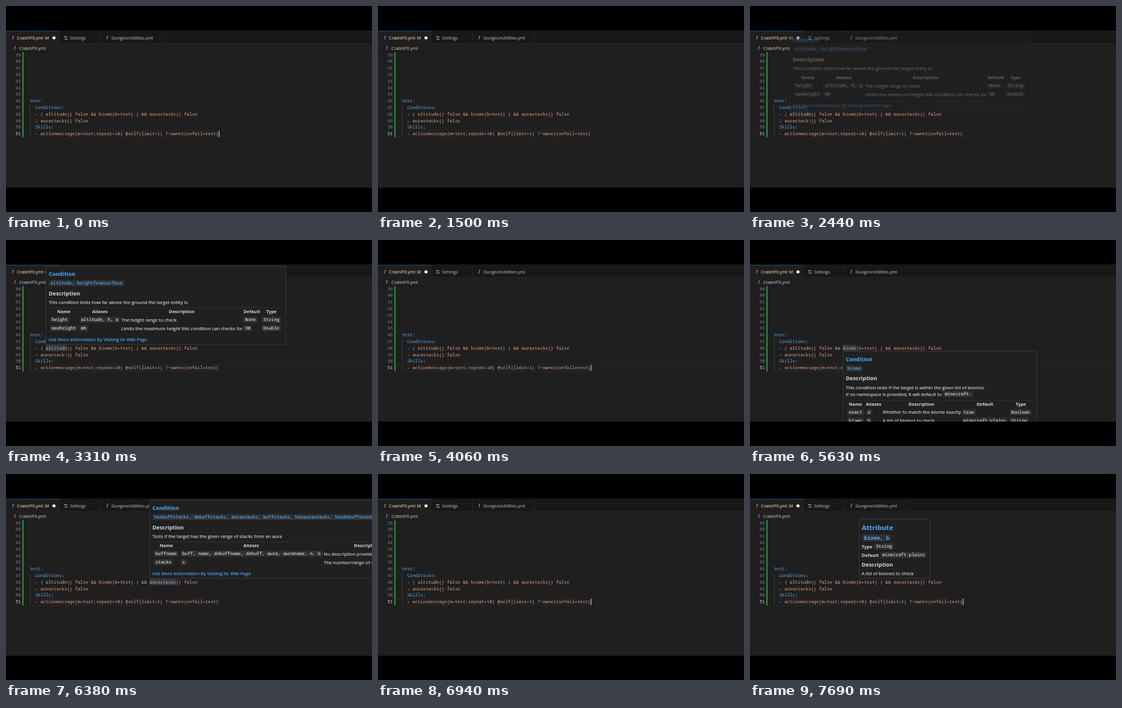
An HTML page that plays this animation: 600 by 338 pixels, repeating every 8000 ms.

```html
<!DOCTYPE html>
<html lang="en">
<head>
<meta charset="utf-8">
<title>Editor hover help</title>
<style>
html, body { margin: 0; width: 100%; height: 100%; overflow: hidden; background: #000; }
svg { display: block; width: 600px; height: 338px; }
text {
  white-space: pre; font: 7.58px "Open Sans", "Noto Sans", sans-serif;
  color: #d6d6d6; fill: currentColor; stroke: currentColor; stroke-width: .15px;
}
tspan { fill: currentColor; stroke: currentColor; }
.tab { font-size: 7px; color: #a2a2a2; }
.path { color: #b0b0b0; }
.changed { color: #e2c08d; }
.mono { font: 7.27px "Noto Sans Mono", "DejaVu Sans Mono", monospace; }
.code { color: #ccc; stroke-width: .08px; }
.num { text-anchor: end; color: #6e7681; }
.now { color: #ccc; }
.key { color: #569cd6; }
.str { color: #ce9178; }
.bang { font-size: 9px; font-weight: 700; font-style: italic; color: #a074c4; }
.head { font-size: 8.95px; font-weight: 700; stroke: none; }
.title { font-size: 11.2px; font-weight: 700; stroke: none; }
.th { font-size: 7.3px; font-weight: 700; text-anchor: middle; stroke: none; }
.bold { font-weight: 700; stroke: none; }
.big { font-size: 8.6px; }
.blue { color: #4daafc; }
.chip { fill: #303031; }
.word { fill: #2b3b47; }
.box { fill: #202020; stroke: #404040; stroke-width: .8; }

.pop { opacity: 0; animation: 8s step-end infinite; }
.altitude { animation-name: altitude; }
.biome { animation-name: biome; }
.aura { animation-name: aura; }
.attr { animation-name: attr; }
@keyframes altitude { 0% { opacity: 0 } 30.47% { opacity: .35 } 31.25% { opacity: .8 } 32.03% { opacity: 1 } 46.875%, 100% { opacity: 0 } }
@keyframes biome { 0% { opacity: 0 } 55.47% { opacity: .35 } 56.25% { opacity: .8 } 57.03% { opacity: 1 } 74.22%, 100% { opacity: 0 } }
@keyframes aura { 0% { opacity: 0 } 74.22% { opacity: .35 } 75% { opacity: .8 } 75.78% { opacity: 1 } 84.375%, 100% { opacity: 0 } }
@keyframes attr { 0% { opacity: 0 } 90.625% { opacity: .35 } 91.41% { opacity: .8 } 92.19%, 100% { opacity: 1 } }

#caret { animation: blink 1s step-end -312ms infinite; }
@keyframes blink { 0% { opacity: 1 } 50%, 100% { opacity: 0 } }

#mouse { animation: mouse 8s infinite; }
@keyframes mouse {
  0% { transform: translate(279px, 252px); animation-timing-function: step-end }
  2.34% { transform: translate(279px, 252px); animation-timing-function: steps(12) }
  11.72% { transform: translate(238px, 245px); animation-timing-function: steps(9) }
  18.75% { transform: translate(159px, 235px); animation-timing-function: steps(9) }
  25.78% { transform: translate(97px, 187px); animation-timing-function: step-end }
  42.97% { transform: translate(97px, 187px); animation-timing-function: steps(13) }
  53.125% { transform: translate(175px, 186px); animation-timing-function: step-end }
  65.625% { transform: translate(175px, 186px); animation-timing-function: steps(6) }
  70.31% { transform: translate(235px, 186px); animation-timing-function: step-end }
  84.375% { transform: translate(235px, 186px); animation-timing-function: steps(3) }
  86.72%, 100% { transform: translate(185px, 184px) }
}
</style>
</head>
<body>
<svg id="stage" viewBox="0 0 600 338"></svg>
<script>
const CHAR = 7.27 * 0.6;

// Text is placed by the vertical middle of its capitals.
const text = (x, cy, str, cls = '', drop = 2.7) =>
  `<text class="${cls}" x="${x}" y="${cy + drop}">${str}</text>`;
const rect = (x, y, w, h, fill) =>
  `<rect x="${x}" y="${y}" width="${w}" height="${h}" fill="${fill}"/>`;
const span = (cls, str) => `<tspan class="${cls}">${str}</tspan>`;

const chip = (x, cy, str, cls = '', size = 1) =>
  `<rect class="chip" x="${x - 3}" y="${cy - 4.9 * size}" width="${str.length * CHAR * size + 6}" height="${9.6 * size}" rx="1.5"/>` +
  text(x, cy, str, 'mono ' + cls, 2.4 * size);
const heads = (cy, x, w, cols) => rect(x, cy - 6.2, w, .7, '#363636') +
  cols.map(([mid, str]) => text(mid, cy, str, 'th')).join('');
const row = (cy, xs, cells) => cells.map((str, i) =>
  i === 2 ? text(xs[i], cy, str) : chip(xs[i], cy, str)).join('');
const link = (x, cy) => text(x, cy, 'Get More Information By Visiting Its Wiki Page', 'blue');

const word = (name, x, length) =>
  `<rect class="pop word ${name}" x="${x}" y="172" width="${length * CHAR}" height="10.5"/>`;
const popup = (name, [x, y, w, h], body) => `<g class="pop ${name}">` +
  `<rect class="box" x="${x}" y="${y}" width="${w}" height="${h}" rx="1.5"/>${body.join('')}</g>`;

function chrome() {
  return rect(0, 40, 600, 258, '#1f1f1f') + rect(0, 40, 600, 22, '#181818') +
    rect(0, 41, 86.5, 21.5, '#1f1f1f') + rect(0, 41, 86.5, .8, '#0c5085') +
    rect(86.5, 61.5, 513.5, .7, '#2b2b2b') + rect(0, 75, 600, .9, '#181818') +
    [86.5, 155, 256.5].map(x => rect(x, 41, .7, 21, '#2b2b2b')).join('') +
    text(10, 52, '!', 'bang', 3.2) + text(18, 52.5, 'CrateVFX.yml', 'tab changed', 2.5) +
    text(64, 52, 'M', 'tab changed') +
    '<circle cx="78.7" cy="52.3" r="2.5" fill="#fff"/>' +
    '<path d="M95 50.5h6M95 54.2h6M97 49v3M99.3 52.7v3" stroke="#b0b0b0" stroke-width=".8"/>' +
    text(105, 52.5, 'Settings', 'tab', 2.5) +
    text(164.5, 52, '!', 'bang', 3.2) + text(173, 52.5, 'DungeonUtilities.yml', 'tab', 2.5) +
    text(13, 68.5, '!', 'bang', 3.2) + text(22, 69, 'CrateVFX.yml', 'tab path', 2.5);
}

function code() {
  const lineY = n => 80 + (n - 39) * 10.8;
  const put = (n, x, body) => text(x, lineY(n), body, 'mono code', 2.6);
  const item = str => '- ' + span('str', str);
  let out = rect(29, 204.3, 571, .7, '#2b2b2b') + rect(29, 214.9, 571, .7, '#2b2b2b') +
    rect(26.9, 75.5, 1.7, 140, '#2ea846') + rect(39.2, 162, .7, 53, '#454545');
  for (let n = 39; n <= 51; n++)
    out += text(24.2, lineY(n), n, 'mono code num' + (n === 51 ? ' now' : ''), 2.6);
  return out +
    word('altitude', 65.1, 8) + word('biome', 152.3, 5) + word('aura', 235.3, 10) +
    put(46, 39, span('key', 'test') + ':') +
    put(47, 47.7, span('key', 'Conditions') + ':') +
    put(48, 47.7, item('( altitude{} false &amp;&amp; biome{b=test} ) &amp;&amp; aurastacks{} false')) +
    put(49, 47.7, item('aurastacks{} false')) +
    put(50, 47.7, span('key', 'Skills') + ':') +
    put(51, 47.7, item('actionmessage{m=test;repeat=10} @self{limit=1} ?~owner{onfail=test}')) +
    '<rect id="caret" x="348.7" y="204.8" width="1.1" height="10" fill="#d4d4d4"/>';
}

function popups() {
  const altX = [75, 123, 189, 392, 422];
  const biomeX = [162, 193, 217.5, 350, 428];
  const auraX = [245, 289, 521];
  return popup('altitude', [65.2, 42.8, 393.8, 128.4], [
    text(70, 56, 'Condition', 'head blue', 3.2),
    chip(73, 71, 'altitude, heightfromsurface', 'blue'),
    text(70, 87.5, 'Description', 'head', 3.2),
    text(70, 102, 'This condition tests how far above the ground the target entity is.'),
    heads(117.5, 70, 384, [[95, 'Name'], [154, 'Aliases'], [288, 'Description'], [403, 'Default'], [435, 'Type']]),
    row(131, altX, ['height', 'altitude, h, a', 'The height range to check', 'None', 'String']),
    row(145, altX, ['maxheight', 'mh', 'Limits the maximum height this condition can checks for', '30', 'Double']),
    link(70, 163)
  ]) + popup('biome', [152.4, 182.8, 317.6, 140], [
    text(157, 196, 'Condition', 'head blue', 3.2),
    chip(160, 211, 'biome', 'blue'),
    text(157, 227, 'Description', 'head', 3.2),
    text(157, 242, 'This condition tests if the target is within the given list of biomes.'),
    text(157, 253, 'If no namespace is provided, it will default to'),
    chip(319.5, 253, 'minecraft:'),
    heads(269, 157, 308, [[173, 'Name'], [202.5, 'Aliases'], [281, 'Description'], [385, 'Default'], [444, 'Type']]),
    row(282.5, biomeX, ['exact', 'e', 'Whether to match the biome exactly', 'true', 'Boolean']),
    row(296.3, biomeX, ['biome', 'b', 'A list of biomes to check', 'minecraft:plains', 'String'])
  ]) + popup('aura', [235.4, 42.8, 400, 128.4], [
    text(240, 56, 'Condition', 'head blue', 3.2),
    chip(243, 71, 'hasbuffstacks, debuffstacks, aurastacks, buffstacks, hasaurastacks, hasdebuffstacks', 'blue'),
    text(240, 87.5, 'Description', 'head', 3.2),
    text(240, 102, 'Tests if the target has the given range of stacks from an aura'),
    heads(117.5, 240, 390, [[263, 'Name'], [402, 'Aliases'], [591.5, 'Description']]),
    row(131, auraX, ['buffname', 'buff, name, debuffname, debuff, aura, auraname, n, b', 'No description provided']),
    row(145, auraX, ['stacks', 's', 'The number/range of stacks']),
    link(240, 163)
  ]) + popup('attr', [178.9, 74, 116.3, 97.2], [
    text(183, 88, 'Attribute', 'title blue', 4),
    chip(187, 105, 'biome, b', 'big bold blue', 8.6 / 7.27),
    text(183, 119, 'Type', 'bold'), chip(206.5, 119, 'String'),
    text(183, 133, 'Default', 'bold'), chip(217, 133, 'minecraft:plains'),
    text(183, 148.5, 'Description', 'head', 3.2),
    text(183, 163, 'A list of biomes to check')
  ]);
}

const beam = 'M-1.8 -3.6H1.8M0 -3.6V3.6M-1.8 3.6H1.8';
const mouse = `<g id="mouse" fill="none"><path d="${beam}" stroke="#484848" stroke-width="1.6"/>` +
  `<path d="${beam}" stroke="#050505" stroke-width=".9"/></g>`;

document.getElementById('stage').innerHTML = chrome() + code() + popups() +
  rect(0, 298, 600, 40, '#000') + mouse;
</script>
</body>
</html>
```
